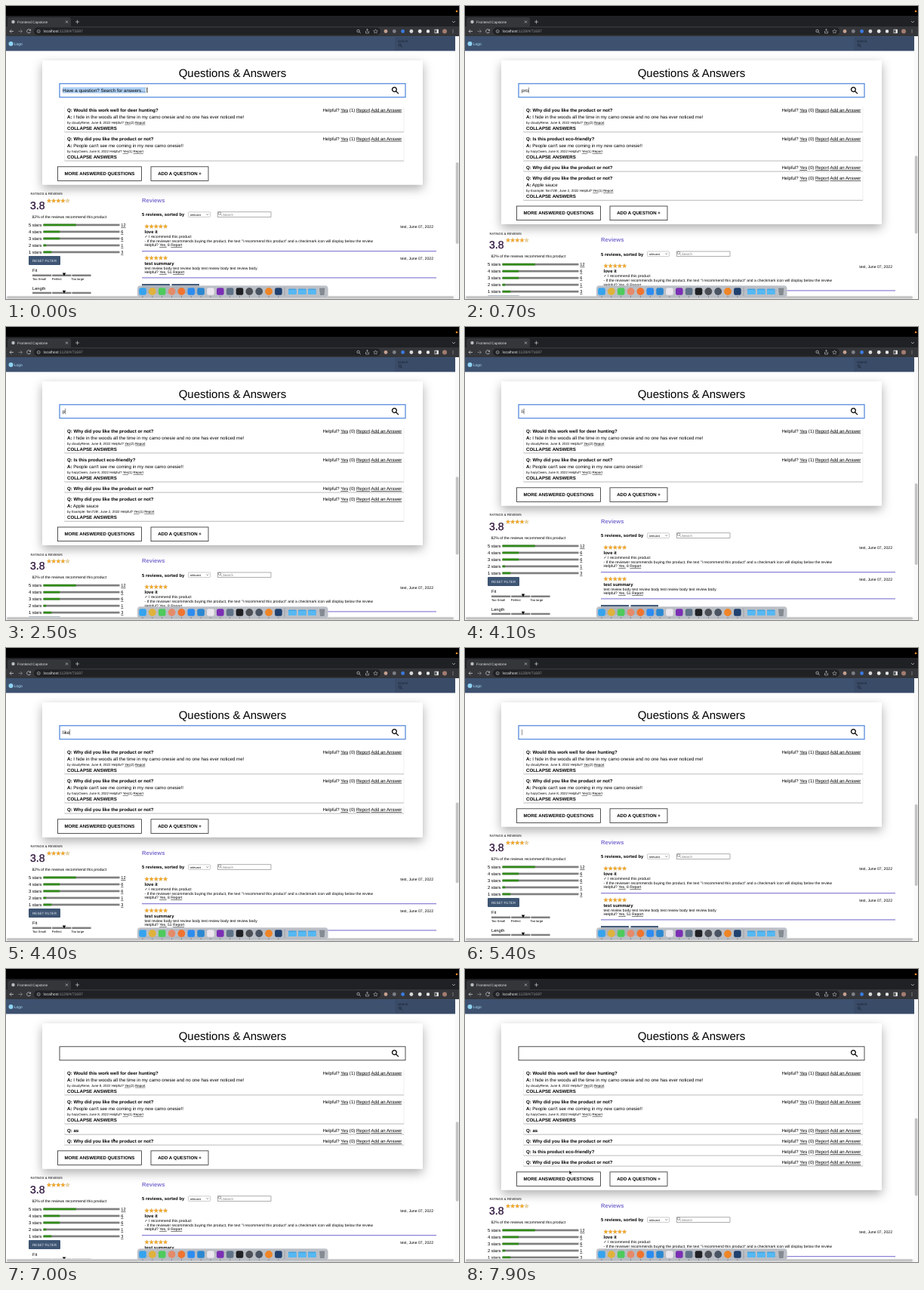
Write an HTML page that moves like this. It is 600x388 px and loops after 8 s.

```html
<!DOCTYPE html>
<html lang="en">
<head>
<meta charset="utf-8">
<title>Questions and answers</title>
<style>
html, body { margin: 0; width: 100%; height: 100%; overflow: hidden; background: #fff; }
svg { display: block; width: 600px; height: 388px; font-family: "Liberation Sans", Arial, "DejaVu Sans", sans-serif; text-rendering: geometricPrecision; }
.u { text-decoration: underline; }
.card { filter: drop-shadow(0 5px 7px rgba(0,0,0,.32)); }
</style>
</head>
<body>
<svg viewBox="0 0 600 388">
  <g id="page"></g>
  <g id="frame"></g>
  <g id="cursor"></g>
</svg>
<script>
const $ = id => document.getElementById(id);

// y is the middle of the capitals
const text = (x, y, s, size = 6.1, o = '') =>
  `<text x="${x}" y="${y + size * .36}" font-size="${size}" ${o}>${s}</text>`;
const rect = (x, y, w, h, fill, o = '') =>
  `<rect x="${x}" y="${y}" width="${w}" height="${h}" fill="${fill}" ${o}/>`;
const dot = (x, y, r, fill) => `<circle cx="${x}" cy="${y}" r="${r}" fill="${fill}"/>`;
const line = (d, color, w = 1) => `<path d="${d}" fill="none" stroke="${color}" stroke-width="${w}"/>`;
const link = s => `<tspan class="u">${s}</tspan>`;
const lens = (x, y, r, color, w) =>
  line(`M${x - r} ${y}a${r} ${r} 0 1 1 ${2 * r} 0a${r} ${r} 0 1 1 ${-2 * r} 0M${x + r * .7} ${y + r * .7}l${r * 1.2} ${r * 1.2}`, color, w);
const bold = 'font-weight="700"', mid = 'text-anchor="middle"', end = 'text-anchor="end"';

const star = (x, y, fill) => {
  let p = '';
  for (let i = 0; i < 10; i++) {
    const r = i % 2 ? 1.3 : 3, a = i * Math.PI / 5;
    p += `${x + r * Math.sin(a)},${y - r * Math.cos(a)} `;
  }
  return `<polygon points="${p}" fill="${fill}" stroke="#b98a30" stroke-width=".25"/>`;
};
const stars = (x, y, full) =>
  [0, 1, 2, 3, 4].map(i => star(x + i * 6.15, y, i < full ? '#f7a823' : '#ead9b0')).join('');

// ---------- questions ----------
const deer = 'Would this work well for deer hunting?';
const why = 'Why did you like the product or not?';
const eco = 'Is this product eco-friendly?';
const answers = [
  ['I hide in the woods all the time in my camo onesie and no one has ever noticed me!', 'cloudyRene, June 8, 2022', 2],
  ["People can't see me coming in my new camo onesie!!", 'hazyOwen, June 8, 2022', 1],
  null,
  ['Apple sauce', 'Example: finn728!, June 2, 2022', 1]
];
const lists = {
  start: { qs: [deer, why], votes: 1, shown: 2 },
  product: { qs: [why, eco, why, why], votes: 0, shown: 4 },
  like: { qs: [why, why, why], votes: 0, shown: 2 },
  more: { qs: [deer, why, 'as', why], votes: 1, shown: 2 },
  all: { qs: [deer, why, 'as', why, eco, why], votes: 1, shown: 2 }
};

function question(y, q, answer, votes) {
  const h = answer ? 33.5 : 9.3;
  let s = rect(77.5, y - 4, 449.5, h, '#fff') +
    line(`M77.5 ${y - 4}v${h}M527 ${y - 4}v${h}`, '#e4e4e4', .6) +
    line(`M77.5 ${y - 4 + h}H527`, '#b4b4b4', .9) +
    text(81, y, 'Q: ' + q, 6.1, bold) +
    text(524.3, y, `Helpful? ${link('Yes')} (${votes}) ${link('Report')} ${link('Add an Answer')}`, 6.07, end);
  if (answer) {
    const [body, by, n] = answer;
    s += text(81, y + 9, `<tspan ${bold}>A:</tspan> ${body}`, 6.13) +
      text(81, y + 16.8, `by ${by} Helpful? ${link('Yes')}(${n}) ${link('Report')}`, 4.45) +
      text(81, y + 24, 'COLLAPSE ANSWERS', 6.1, bold);
  }
  return s;
}

function button(x, y, w, label) {
  return rect(x, y - 9.3, w, 18.6, '#fff', 'stroke="#2a2a2a" stroke-width=".8"') +
    text(x + w / 2, y, label, 6.1, bold + ' ' + mid);
}

// ---------- ratings and reviews ----------
function scale(y, name, labels) {
  return text(35, y, name, 5.7) +
    [0, 1, 2].map(i => rect(35 + i * 26.2, y + 5.2, 25.2, 2.5, '#808080') +
      text(35 + i * 25.7, y + 11.5, labels[i], 4.1)).join('') +
    `<path d="M74.8 ${y + 3.2}h4.4l-2.2 4z"/>`;
}

function ratings() {
  let s = text(32.5, 249, 'RATINGS &amp; REVIEWS', 4.15) +
    text(32, 264, '3.8', 14, 'fill="#2a1038" stroke="#2a1038" stroke-width=".3"') + stars(57, 258, 4) +
    text(34.5, 279, '82% of the reviews recommend this product', 5.08);
  [12, 6, 6, 1, 3].forEach((n, i) => {
    const y = 290 + i * 9;
    s += text(30, y, `${5 - i} stars`, 5.8) +
      rect(49.5, y - 1.4, 101, 2.7, '#808080') +
      rect(49.5, y - 1.4, 101 * n / 28, 2.7, '#2f8a17') +
      text(152.3, y, link(n), 5.6);
  });
  return s + rect(30, 331, 42, 12, '#3e5573', 'rx="1"') +
    text(51, 337, 'RESET FILTER', 4.6, 'fill="#e4ecf5" ' + mid) +
    scale(350.3, 'Fit', ['Too Small', 'Perfect', 'Too large']) +
    scale(373.5, 'Length', ['', '', '']);
}

function review(y, title, lines, votes) {
  const last = y + 13 + lines.length * 5.8;
  return stars(186.5, y, 5) + text(566, y + .5, 'test, June 07, 2022', 5.15, end) +
    text(183.5, y + 7, title, 6, bold) +
    lines.map((l, i) => text(183.5, y + 13.4 + i * 5.8, l, 5.02)).join('') +
    text(183.5, last, `Helpful? ${link('Yes,')} ${votes} ${link('Report')}`, 5);
}

function reviews() {
  const rule = y => line(`M180 ${y}H570`, '#8c83d6', 1.3);
  return text(180, 256.8, 'Reviews', 7.6, bold + ' fill="#7d71d0"') +
    text(180, 276.3, '5 reviews, sorted by', 5.9, bold) +
    rect(241.5, 272.8, 29, 6.6, '#fff', 'stroke="#999" stroke-width=".5" rx=".8"') +
    text(244, 276.2, 'relevant', 3.9) + line('M265.5 275.4l1.3 1.3l1.3 -1.3', '#333', .6) +
    rect(280.5, 272.8, 70.5, 6.6, '#fff', 'stroke="#777" stroke-width=".6"') +
    lens(283, 274.6, 1.8, '#666', .6) + text(287, 276.3, 'Search', 4.4, 'fill="#777"') +
    review(292, 'love it', ['✓ I recommend this product',
      '- If the reviewer recommends buying the product, the text "I recommend this product" and a checkmark icon will display below the review'], 8) +
    rule(324.6) +
    review(333.7, 'test summary', ['test review body '.repeat(4)], 51) +
    rule(359.8) + rect(180, 368, 37, 13, '#3e5573') + rect(219.5, 368, 36.5, 13, '#3e5573');
}

function page(list, typed, focus, selected) {
  let y = 137.4, rows = '';
  list.qs.forEach((q, i) => {
    const a = i < list.shown ? answers[i] : null;
    // rows added later have no votes yet
    rows += question(y, q, a, i < 2 ? list.votes : 0);
    y += a ? 38.2 : 14;
  });
  const shift = y - 213.8, by = y + 8.3;
  return rect(0, 40, 600, 348, '#fff') +
    `<g class="card">${rect(48, 72, 504, by + 14.7 - 72, '#fff')}</g>` +
    text(300, 88.1, 'Questions &amp; Answers', 15, mid) +
    rect(71, 102.8, 458, 18, '#fff', focus ? 'stroke="#4a82dc" stroke-width="1.2"' : 'stroke="#222" stroke-width=".8"') +
    (selected ? rect(75, 107.5, 110, 8, '#aed0f4') : '') +
    text(75, 111.8, typed, 6.25) + lens(514.4, 110.6, 2.9, '#000', 1.3) +
    rows + button(68.5, by, 111, 'MORE ANSWERED QUESTIONS') + button(192, by, 76, 'ADD A QUESTION +') +
    `<g transform="translate(0 ${shift})">${ratings()}${reviews()}</g>` +
    rect(595, 40, 5, 348, '#fafafa') + rect(595.8, 207 - shift * .17, 3.6, 108 - shift * .09, '#c3c3c3', 'rx="1.8"') +
    rect(0, 383.5, 595, 4.5, '#f6f6f6') + rect(1, 384.2, 592, 3.2, '#c3c3c3', 'rx="1.6"');
}

// ---------- browser and dock ----------
function frame() {
  const pale = '#c9cbce';
  let s = rect(0, 0, 600, 14, '#000') + dot(597, 7, 1.3, '#f08a24') +
    rect(0, 13, 600, 14, '#202124') + rect(2, 15, 84, 13, '#35363a', 'rx="2.5"') +
    rect(0, 27, 600, 13, '#35363a') + rect(37, 28.5, 459, 10, '#202124', 'rx="5"') +
    dot(9.5, 21, 2.2, '#b9bcc0') + text(15, 21.2, 'Frontend Capstone', 4.7, 'fill="#e4e6e8"') +
    line('M79 19.5l3 3m0 -3l-3 3M92 21h5m-2.5 -2.5v5M591 20l2 2l2 -2', pale, .7) +
    line('M10 33.5H5m2.3 -2.3l-2.3 2.3l2.3 2.3', pale, .8) +
    line('M16.5 33.5h5m-2.3 -2.3l2.3 2.3l-2.3 2.3', '#85878a', .8) +
    line('M32.3 32a2.5 2.5 0 1 0 .2 2.2M32.6 30.8v1.7h-1.7', pale, .8) +
    line('M41.2 33.5a2 2 0 1 1 4 0a2 2 0 1 1 -4 0M43.2 33v1.4', pale, .6) +
    text(49.5, 33.6, 'localhost<tspan fill="#8f9296">:1128/#/71697</tspan>', 5.1, 'fill="#e6e8ea"') +
    lens(466.6, 33, 1.7, pale, .7) +
    line('M476.5 33v3h4v-3M478.5 34.5v-4m-1.3 1.2l1.3 -1.3l1.3 1.3', pale, .6) +
    line('M489.5 30.8l.8 1.8l2 .2l-1.5 1.3l.4 2l-1.7 -1l-1.7 1l.4 -2l-1.5 -1.3l2 -.2z', pale, .5);
  ['#c4a090', '#7d8088', '#3a7be0', '#d8d8d8', '#e8e8e8'].forEach((c, i) => s += dot(503 + i * 11.3, 33.5, 2.4, c));
  s += rect(557, 31.5, 4, 4, '#eee', 'rx="1"') +
    rect(568, 31.2, 4.6, 4.6, 'none', 'stroke="#eee" stroke-width=".7"') + rect(570.4, 31.2, 2.2, 4.6, '#eee') +
    dot(581, 33.5, 3, '#a37c70') + [-1.8, 0, 1.8].map(d => dot(592, 33.5 + d, .5, pale)).join('') +
    rect(0, 40, 595, 19.5, '#3e5270') + rect(515, 41, 80, 18, '#394b67') +
    dot(6.5, 50, 3, '#8fd3f2') + text(10.7, 50.2, 'Logo', 5, 'fill="#a9dcf2"') +
    text(519, 46, 'search', 4.4, 'fill="#1a2230"') + lens(521.8, 51.6, 1.7, '#1a2230', .7) +
    rect(174, 370.3, 252.5, 16.2, '#b6bbc2', 'rx="4" fill-opacity=".93" stroke="#d6d9dd" stroke-width=".5"');
  const apps = ['#35a3ee', 'o#e0b23c', '#4ecb5c', 'o#e58a6a', 'o#f0742f', '#2d8cf0', '#2b87d1', '#ece6ee',
    '#7b2fb4', '#5f7388', '#1f2124', 'o#4c4f55', 'o#4a5462', 'o#ef8526', '#20406e'];
  apps.forEach((c, i) => {
    const x = 181 + i * 12.85;
    s += c[0] === 'o' ? dot(x, 378, 4.9, c.slice(1)) : rect(x - 4.8, 373.2, 9.6, 9.6, c, 'rx="2.2"');
    s += dot(x, 385.1, .5, '#333');
  });
  s += line('M369 372.5V384', '#8c9096', .6);
  for (let i = 0; i < 3; i++)
    s += rect(374 + i * 13, 374.5, 10.5, 7.5, '#3b9fe0', 'rx="1"') + rect(374 + i * 13, 375.8, 10.5, 6.2, '#56b8f2', 'rx="1"');
  return s + '<path d="M414.5 373h8.5l-1 10.5h-6.5z" fill="#858b92" stroke="#d5d8db" stroke-width=".6"/>';
}

// ---------- timeline ----------
const keys = [[0, 'Have a question? Search for answers...'], [400, 'p'], [500, 'pr'], [700, 'pro'], [800, 'prod'],
  [900, 'produ'], [1000, 'produc'], [1200, 'product'], [1600, 'produc'], [1700, 'produ'], [1900, 'prod'],
  [2000, 'pro'], [2200, 'pr'], [2400, 'p'], [2600, ''], [3900, 'l'], [4100, 'li'], [4200, 'lik'], [4300, 'like'],
  [5000, 'lik'], [5100, 'li'], [5300, '']];
const views = [[0, 'start'], [700, 'product'], [2600, 'start'], [4200, 'like'], [5300, 'start'], [6800, 'more'], [7600, 'all']];
const path = [[6100, 187, 111], [6700, 142, 224], [7050, 142, 224], [7450, 138, 250], [7600, 138, 250], [7900, 138, 266.5]];
const at = (list, t) => list.filter(k => k[0] <= t).pop();

function pointer(t) {
  let i = 0;
  while (i < path.length - 2 && t > path[i + 1][0]) i++;
  const [a, b] = [path[i], path[i + 1]];
  let k = Math.min(1, Math.max(0, (t - a[0]) / (b[0] - a[0])));
  k = k * k * (3 - 2 * k);
  return [a[1] + (b[1] - a[1]) * k, a[2] + (b[2] - a[2]) * k];
}

function cursor(t, key, focus) {
  let s = '';
  if (t < 400) return line('M185.6 108.4q1.2 0 1.2 1v4q0 1 1.2 1m0 -6q-1.2 0 -1.2 1v4q0 1 -1.2 1', '#222', .6);
  if (focus && (t - key[0]) % 1000 < 500) {
    const em = { l: .222, i: .222, k: .5, r: .333, c: .5, t: .278 };
    const w = [...key[1]].reduce((sum, c) => sum + (em[c] || .556), 0) * 6.25;
    s += rect(75 + w, 107.8, .6, 7.6, '#444');
  }
  if (t >= 6100) {
    const [x, y] = pointer(t);
    s += `<path d="M${x} ${y}v5.4l1.3 -1.2l.9 2l.9 -.4l-.9 -2h1.7z" stroke="#fff" stroke-width=".5"/>`;
  }
  return s;
}

$('frame').innerHTML = frame();
const begin = performance.now();
let shown = '';
function draw() {
  const t = (performance.now() - begin) % 8000;
  const key = at(keys, t), view = at(views, t)[1], focus = t < 6700;
  const state = [view, key[1], focus].join('|');
  if (state !== shown) {
    shown = state;
    $('page').innerHTML = page(lists[view], key[1], focus, t < 400);
  }
  $('cursor').innerHTML = cursor(t, key, focus);
  requestAnimationFrame(draw);
}
draw();
</script>
</body>
</html>
```
